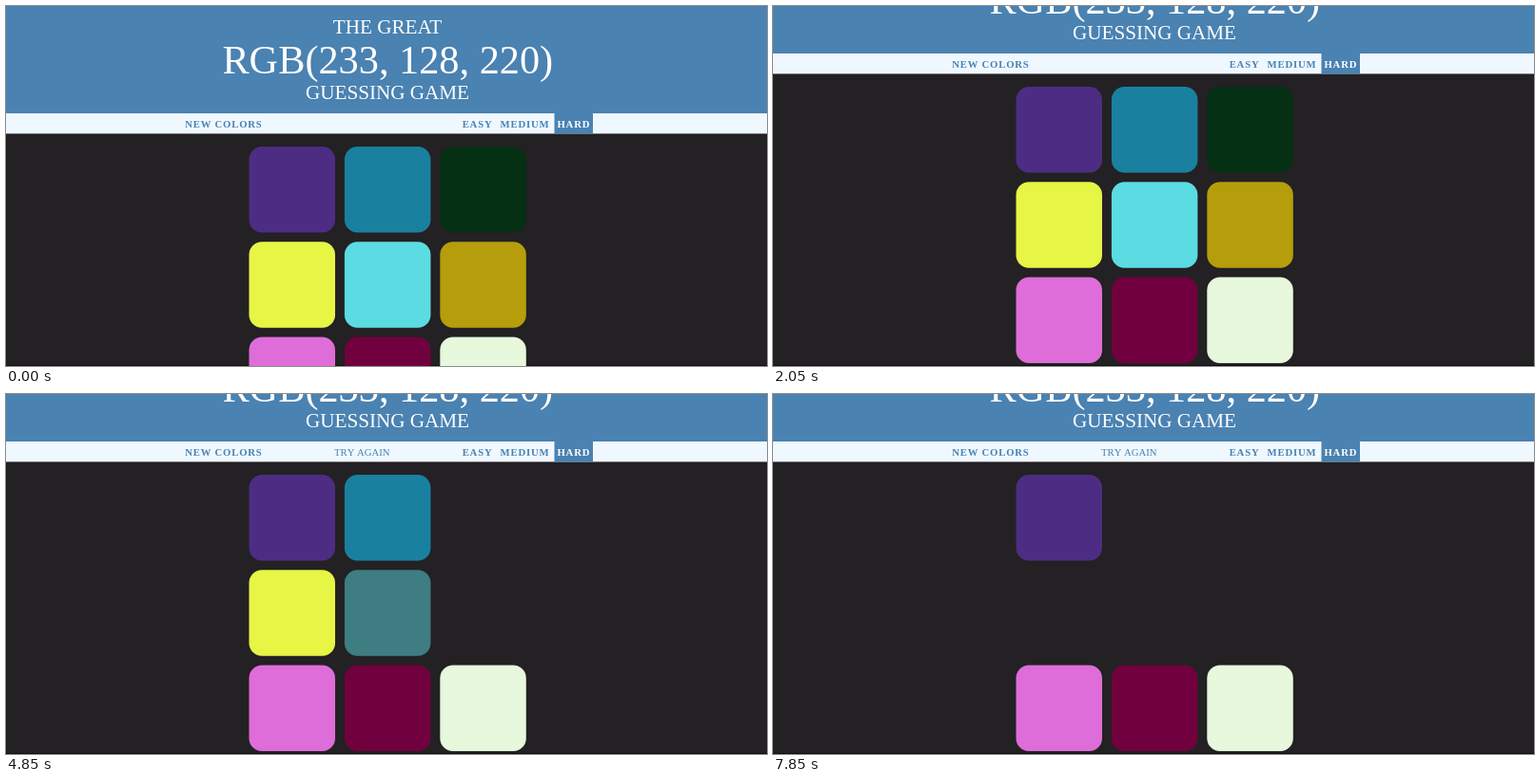
These frames come from a looping animation (800 px wide and 379 px high, 8 s). An HTML page:

```html
<!DOCTYPE html>
<html lang="en">
<head>
<meta charset="utf-8">
<title>Color guessing game</title>
<style>
  html, body { margin: 0; width: 100%; height: 100%; overflow: hidden; background: #232123; }
  svg { display: block; width: 800px; height: 379px; }
  text { font-family: "Liberation Serif", "Times New Roman", serif; fill: #fff; }
  .title { font-size: 21.15px; text-anchor: middle; }
  .big { font-size: 42.3px; }
  .nav { font-size: 10.7px; font-kerning: none; fill: #4682b4; }
  .btn { font-weight: bold; letter-spacing: .8px; }
  .on { fill: #fff; }
</style>
</head>
<body>
<svg viewBox="0 0 800 379">
  <rect width="800" height="379" fill="#232123"/>
  <rect y="378" width="800" height="1" fill="#101010"/>
  <g id="page">
    <rect width="800" height="113" fill="#4a82b1"/>
    <text class="title" x="401" y="28.5">THE GREAT</text>
    <text class="title big" x="401.3" y="70.5">RGB(233, 128, 220)</text>
    <text class="title" x="401" y="98.4">GUESSING GAME</text>

    <rect y="113" width="800" height="21.4" fill="#f0f8ff"/>
    <rect x="576.5" y="113" width="40.5" height="21.4" fill="#4a82b1"/>
    <text class="nav btn" x="188.2" y="127.7">NEW COLORS</text>
    <text class="nav" id="hint" x="345" y="127.7">TRY AGAIN</text>
    <text class="nav btn" x="479.7" y="127.7">EASY</text>
    <text class="nav btn" x="519.6" y="127.7">MEDIUM</text>
    <text class="nav btn on" x="579.5" y="127.7">HARD</text>
    <g id="tiles"></g>
  </g>
</svg>
<script>
  const LOOP = 8000, FADE = 700, SCROLL = 63;

  // color, time of the click that fades the tile out
  const tiles = [
    ['#4c2d83'], ['#1a80a0', 5490], ['#053014', 2500],
    ['#e7f545', 6455], ['#5bdce2', 4645], ['#b69d0c', 3360],
    ['#de6dd9'], ['#71003e'], ['#e7f8dd']
  ];

  // steps: [ms, value, easing towards the next step]
  function play(el, prop, steps) {
    const frames = steps.map(([ms, value, easing = 'linear']) =>
      ({ offset: ms / LOOP, [prop]: value, easing }));
    el.animate(frames, { duration: LOOP, iterations: Infinity });
  }

  function addTile([color, click], i) {
    const r = document.createElementNS('http://www.w3.org/2000/svg', 'rect');
    const attrs = {
      x: 255.5 + (i % 3) * 100.4,
      y: 148 + Math.floor(i / 3) * 100.3,
      width: 90.5, height: 90.5, rx: 13.6, fill: color
    };
    for (const k in attrs) r.setAttribute(k, attrs[k]);
    document.getElementById('tiles').append(r);
    if (click) play(r, 'opacity', [[0, 1], [click, 1, 'ease'], [click + FADE, 0], [LOOP, 0]]);
  }

  tiles.forEach(addTile);

  const up = `translateY(-${SCROLL}px)`;
  play(document.getElementById('page'), 'transform', [
    [0, 'translateY(0px)'], [1000, 'translateY(0px)', 'ease-in-out'], [1650, up], [LOOP, up]
  ]);
  play(document.getElementById('hint'), 'opacity', [[0, 0], [2500, 0], [2500, 1], [LOOP, 1]]);
</script>
</body>
</html>
```
